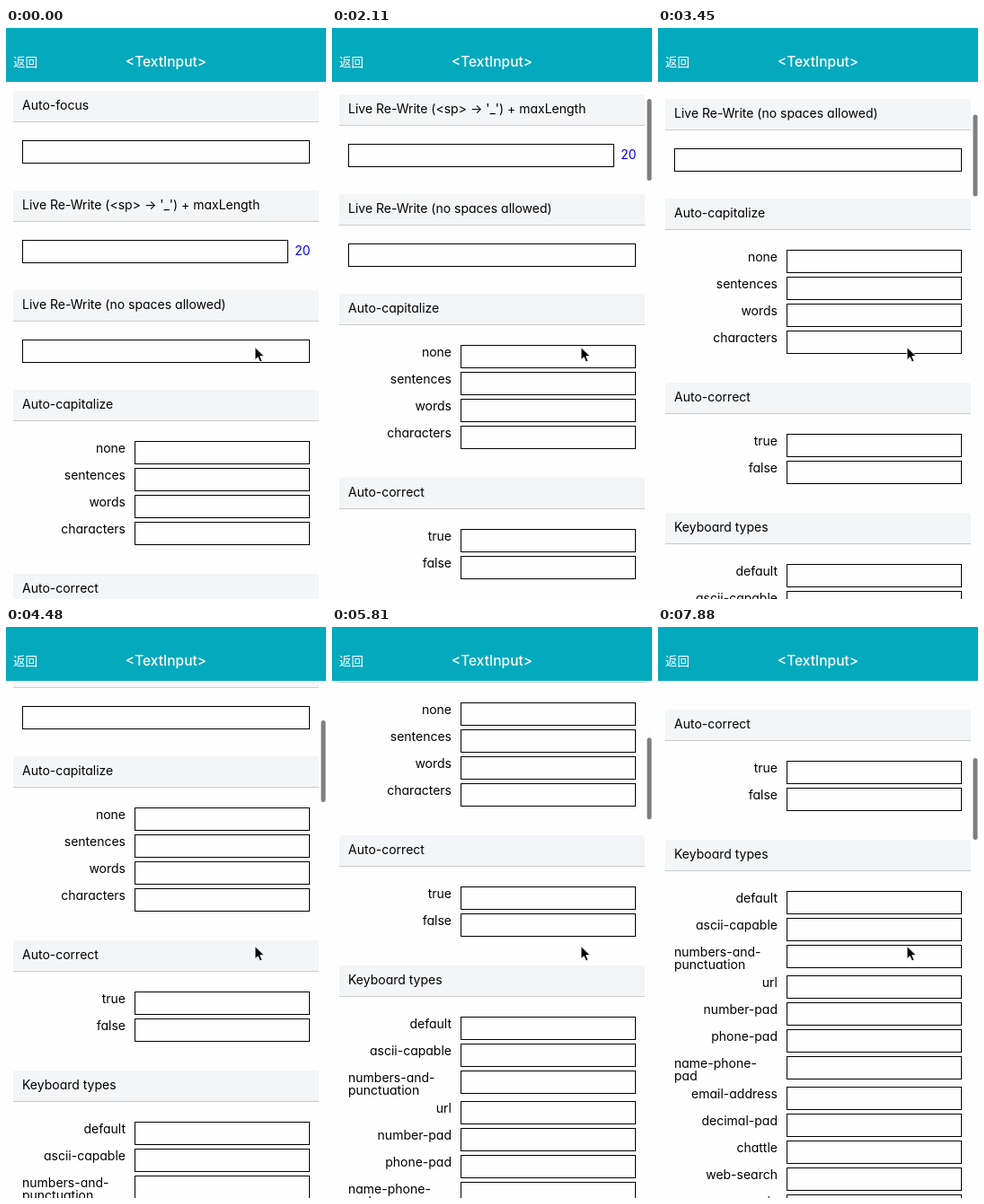
An HTML page that plays this animation: 356x636 px, repeating every 8000 ms.

```html
<!DOCTYPE html>
<html lang="zh">
<head>
<meta charset="utf-8">
<style>
  html, body { margin: 0; width: 100%; height: 100%; overflow: hidden; background: #fefefe; }
  svg { display: block; width: 356px; height: 636px; }
  text { font: 14px Inter, "Open Sans", sans-serif; font-feature-settings: "cv11"; white-space: pre; }
  .label { text-anchor: end; }
  .count { fill: #00f; text-anchor: end; }
  .title { font-size: 15.5px; font-weight: 500; fill: #fff; text-anchor: middle; }
  .back { font: 500 13.5px "Noto Sans CJK SC", "Noto Sans CJK", sans-serif; fill: #fff; }
  .field { fill: #fefefe; stroke: #000; }
</style>
</head>
<body>
<svg viewBox="0 0 356 636">
  <g id="page"></g>
  <rect id="thumb" x="350.5" width="5" height="91" rx="2.5" fill="#7f7f7f"/>
  <rect width="356" height="60" fill="#03a9bd"/>
  <text class="back" x="8" y="43">返回</text>
  <text class="title" x="178" y="43">&lt;TextInput&gt;</text>
  <path d="M277 355.5v14.2l3.2-3 2.3 5.3 2.6-1.1-2.3-5.2h4.6z" stroke="#fff" stroke-width="1" stroke-linejoin="round"/>
</svg>
<script>
const NS = 'http://www.w3.org/2000/svg';
const page = document.getElementById('page');
const thumb = document.getElementById('thumb');

function add(tag, attrs, text) {
  const el = document.createElementNS(NS, tag);
  for (const name in attrs) el.setAttribute(name, attrs[name]);
  if (text) el.textContent = text;
  page.appendChild(el);
}

function heading(y, text) {
  add('path', { d: `M8 ${y + 34}v-31q0-3 3-3h334q3 0 3 3v31z`, fill: '#f4f5f7' });
  add('rect', { x: 8, y: y + 34, width: 340, height: 1, fill: '#cbcccf' });
  add('text', { x: 18, y: y + 21 }, text);
}

function field(x, y, right) {
  add('rect', { class: 'field', x: x + 0.5, y: y + 0.5, width: right - x - 1, height: 25 });
}

// A label with a line break is left-aligned and makes its row taller.
function rows(y, labels) {
  for (const label of labels) {
    const lines = label.split('\n');
    const wrapped = lines.length > 1;
    lines.forEach((line, i) => add('text', {
      class: wrapped ? '' : 'label', x: wrapped ? 18 : 133, y: y + 13 + i * 14
    }, line));
    field(143, y, 338);
    y += wrapped ? 34 : 30;
  }
}

heading(70, 'Auto-focus');
field(18, 125, 338);
heading(181, "Live Re-Write (<sp> -> '_') + maxLength");
field(18, 236, 314);
add('text', { class: 'count', x: 338.5, y: 253 }, '20');
heading(292, 'Live Re-Write (no spaces allowed)');
field(18, 347, 338);
heading(403, 'Auto-capitalize');
rows(460, ['none', 'sentences', 'words', 'characters']);
heading(608, 'Auto-correct');
rows(665, ['true', 'false']);
heading(753, 'Keyboard types');
rows(810, ['default', 'ascii-capable', 'numbers-and-\npunctuation', 'url', 'number-pad',
  'phone-pad', 'name-phone-\npad', 'email-address', 'decimal-pad', 'chattle', 'web-search', 'numeric']);

// Scroll keys: [step, offset]
const LOOP = 8000, START = 485, STEP = 147.5, LAST = 50, FADE = 43;
const keys = [[-1, 0], [11, 107], [20, 213], [22, 229], [24, 229], [27, 259],
  [36, 376], [39, 418], [42, 418], [43, 419], [50, 516]];

const slope = i => (keys[i + 1][1] - keys[i][1]) / (keys[i + 1][0] - keys[i][0]);

// Harmonic mean keeps the curve monotone.
function tangent(i) {
  if (i === 0) return slope(0) * 0.6;
  if (i === keys.length - 1) return slope(i - 1);
  const a = slope(i - 1), b = slope(i);
  return a * b > 0 ? 2 * a * b / (a + b) : 0;
}

function offset(step) {
  let i = 0;
  while (i < keys.length - 2 && step >= keys[i + 1][0]) i++;
  const [x0, y0] = keys[i], [x1, y1] = keys[i + 1];
  const w = x1 - x0, u = (step - x0) / w, v = 1 - u;
  return y0 * v * v * (1 + 2 * u) + y1 * u * u * (3 - 2 * u)
    + w * u * v * (tangent(i) * v - tangent(i + 1) * u);
}

function draw() {
  const t = performance.now() % LOOP;
  const step = Math.max(-1, Math.min(LAST, Math.floor((t - START) / STEP)));
  const scroll = Math.round(offset(step));
  page.setAttribute('transform', `translate(0 ${-scroll})`);
  thumb.setAttribute('y', 61.5 + scroll * 0.164);
  thumb.setAttribute('opacity', step < 0 ? 0 : step === FADE ? 0.55 : 1);
  requestAnimationFrame(draw);
}
draw();
</script>
</body>
</html>
```
